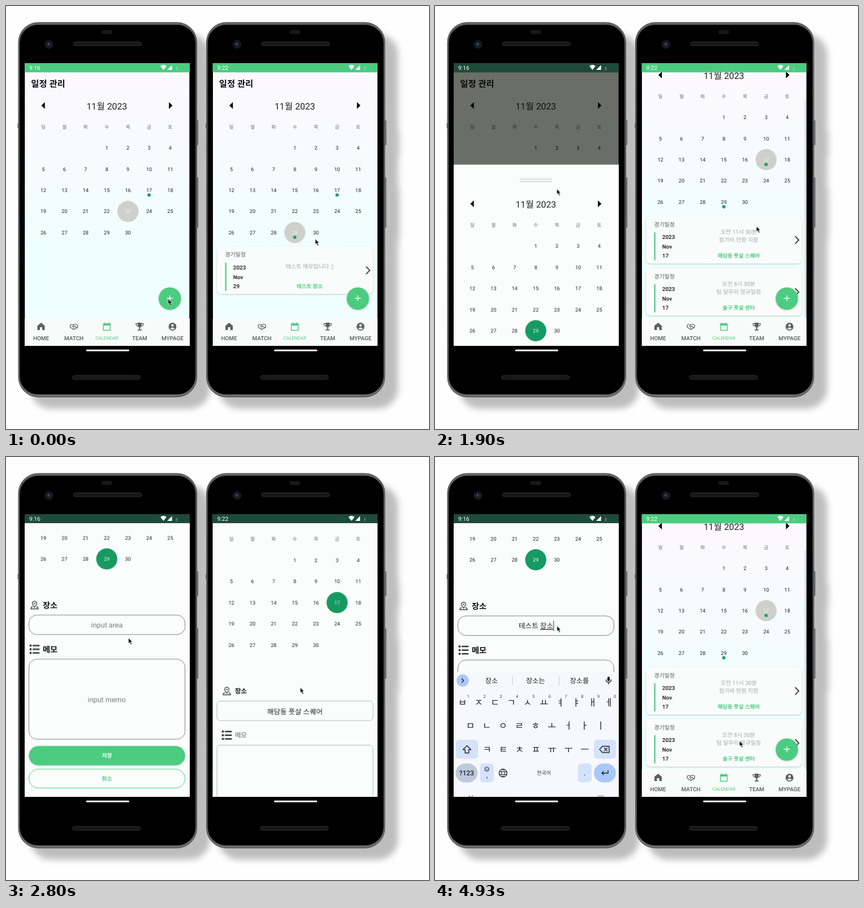
Write an HTML page that moves like this. It is 748x748 px and loops after 5.01 s.

```html
<!DOCTYPE html>
<html lang="ko">
<head>
<meta charset="utf-8">
<title>일정 관리</title>
<style>
html, body { margin: 0; width: 100%; height: 100%; overflow: hidden; background: #fefefe; }
svg { display: block; width: 748px; height: 748px; }
text { font-family: Roboto, "Noto Sans CJK KR", "Noto Sans CJK", sans-serif; text-anchor: middle; text-rendering: geometricPrecision; white-space: pre; }
.start { text-anchor: start; }
.bold { font-weight: 700; }
.mid { font-weight: 500; }
.under { text-decoration: underline; text-decoration-thickness: 1px; text-underline-offset: 2px; }
.line { fill: none; stroke-linecap: round; stroke-linejoin: round; }
.raised { filter: drop-shadow(0 1.2px 1px rgba(0, 0, 0, .22)); }
.shade { filter: blur(6px); }
</style>
</head>
<body>
<svg id="stage" viewBox="0 0 748 748" xmlns="http://www.w3.org/2000/svg"></svg>
<script>
const LOOP = 5010, GREEN = '#4bcc80', DEEP = '#169a62', INK = '#1f2121';
let css = '', count = 0;

// Turns [ms, declaration] stops into a looping keyframe animation.
function anim(stops, ease = 'ease-in-out') {
  const id = 'k' + count++;
  const body = stops.map(([ms, rule]) => `${(ms / LOOP * 100).toFixed(3)}%{${rule}}`).join('');
  css += `@keyframes ${id}{${body}}`;
  return `style="animation:${id} ${LOOP}ms ${ease} infinite"`;
}
const hold = stops => [...stops, [LOOP, ...stops[stops.length - 1].slice(1)]];
const path = stops => anim(hold(stops).map(([ms, x, y]) => [ms, `transform:translate(${x}px,${y}px)`]));
const slide = stops => path(stops.map(([ms, y]) => [ms, 0, y]));
const fade = stops => anim(hold(stops).map(([ms, o]) => [ms, `opacity:${o}`]));
const during = (from, to, inner) => `<g ${anim([[0, `opacity:${from ? 0 : 1}`], [from, 'opacity:1'],
  [to, 'opacity:0'], [LOOP, 'opacity:0']], 'step-end')}>${inner}</g>`;

// Text is placed by its vertical centre.
const text = (x, y, size, str, fill = INK, cls = '') =>
  `<text x="${x}" y="${(y + size * .36).toFixed(2)}" font-size="${size}" fill="${fill}" class="${cls}">${str}</text>`;
const rect = (x, y, w, h, r, fill, more = '') =>
  `<rect x="${x}" y="${y}" width="${w}" height="${h}" rx="${r}" fill="${fill}" ${more}/>`;
const dot = (x, y, r, fill, more = '') => `<circle cx="${x}" cy="${y}" r="${r}" fill="${fill}" ${more}/>`;
const shape = (d, fill) => `<path d="${d}" fill="${fill}"/>`;
const line = (d, color, width = 1) => `<path class="line" d="${d}" stroke="${color}" stroke-width="${width}"/>`;
const at = (x, y, inner) => `<g transform="translate(${x} ${y})">${inner}</g>`;

// Calendar, November 2023
const cell = day => [66 + (day + 2) % 7 * 37.4, 251 + Math.floor((day + 2) / 7) * 37.4];
const number = (day, fill) => text(...cell(day), 9.1, day, fill);
const mark = (day, back, ink) => dot(...cell(day), 18.7, back) + number(day, ink);
const pip = day => { const [x, y] = cell(day); return dot(x, y + 8.4, 2.9, '#18a05e'); };
const grey = day => mark(day, '#cfd0cb', '#f4f4f2');

function calendar() {
  let out = text(178.3, 177, 15.8, '11월 2023') +
    shape('M62.5 176l6.2-6v12z', '#000') + shape('M294.3 176l-6.2-6v12z', '#000');
  [...'일월화수목금토'].forEach((d, i) => out += text(66 + i * 37.4, 213.5, 8.6, d, '#6a6c6b'));
  for (let d = 1; d <= 30; d++) out += number(d);
  return out;
}

function card(y, day, memo, place) {
  const dates = ['2023', 'Nov', day].map((s, i) => text(69.3, 37.3 + i * 16.5, 9.8, s, '#2b2d2c', 'start bold')).join('');
  const top = memo.length > 1 ? 28 : 35.5;
  return at(0, y, rect(40.5, 0, 276, 84, 8, '#fafcfb', 'class="raised"') +
    text(54.7, 14.5, 10, '경기일정', '#555856', 'start mid') +
    rect(55, 28.5, 2.3, 50, 1, GREEN) + dates +
    memo.map((s, i) => text(204.5, top + i * 14.2, 10, s, '#a3a6a4')).join('') +
    text(204.5, 70.3, 9.5, place, GREEN, 'bold') +
    line('M304.8 36l6 6.2-6 6.2', '#222', 1.7));
}

function nav() {
  const g = '#5d615b';
  const icons = [
    shape('M0-7l6.5 5.5V6H2V1h-4v5h-4.5v-7.5z', g),
    line('M-6.5-3l3-1 3 1 3-1.5 4 1.5v4l-2 1-4 3-3-1-4-3v-4M-.5-3l-2 3 2 1 2-2 4 3.5M-1 3.5l1.5 1', g, 1.3),
    line('M-6-5h12V6.500h-12zM-3.500-7v2M3.500-7v2', GREEN, 1.4) + rect(-6, -5, 12, 3, 0, GREEN),
    shape('M-3.500-7h7v5q-.5 3-2.5 3.500V5h2.500v1.800h-7V5H-1V1.500q-2-.5-2.500-3.500z', g) +
      line('M-3.500-5.300h-3q0 4 3.500 4.500M3.500-5.300h3q0 4-3.500 4.500', g, 1.3),
    dot(0, 0, 6.9, g) + dot(0, -2.2, 2.2, '#f9fbfa') + shape('M-4.200 3.600q4.200-4 8.400 0-4.200 3.600-8.400 0z', '#f9fbfa')
  ];
  return rect(33, 553, 292, 48, 0, '#f9fbfa') + ['HOME', 'MATCH', 'CALENDAR', 'TEAM', 'MYPAGE'].map((s, i) => {
    const x = 62 + i * 58.1, on = i === 2;
    return at(x, 567, icons[i]) + text(x, 587.6, on ? 8 : 9.9, s, on ? GREEN : '#555953', on ? '' : 'mid');
  }).join('');
}

const fab = dot(289.7, 517.3, 19.8, GREEN, 'class="raised"') + line('M285 516.8h9.400M289.700 512.100v9.400', '#fff', 1.4);

const pin = line('M-3.800 3.200h-1.600l-1.200 3.300h13.200l-1.200-3.300h-1.600', '#3b3d3d', 1.4) +
  line('M0 3.800l-2.700-4a3.900 3.900 0 1 1 5.400 0z', '#3b3d3d', 1.3) + dot(0, -3, 1.2, '#3b3d3d');
const list = [-6.5, 0, 6.5].map(y => dot(-7, y, 2, '#333') + rect(-3.5, y - 1.3, 12.5, 2.6, 1, '#333')).join('');

// Fields below the sheet's calendar
function form(o) {
  const box = (y, h) => rect(40.5, y, 276, h, o.radius, 'none', `stroke="${o.edge}"`);
  return at(o.icon, 656, pin) + text(o.label, 656, o.size, '장소', '#111', 'start bold') +
    box(673.5, 34.5) + o.place +
    at(o.icon, 734, list) + text(o.label, 734, o.size, '메모', o.memoInk, o.memoClass) +
    box(751.5, o.height) + o.memo +
    rect(40.3, o.save, 276.4, 34, 17, GREEN, 'class="raised"') + text(178.5, o.save + 17.2, 9.8, '저장', '#fff', 'bold') +
    rect(40.5, o.save + 41, 276, 33.3, 16.6, 'none', `stroke="${GREEN}"`) + text(178.5, o.save + 58, 9.8, '취소', GREEN, 'bold');
}

function sheet(fields, picked, scroll, drop) {
  return `<g ${slide(drop)}><g clip-path="url(#page)"><g ${slide(scroll)}>` +
    rect(33, 280.5, 292, 900, 0, '#fafdfc') +
    line('M150.500 306.200h56M150.500 310.400h56', '#b9bcba') +
    at(0, 173.7, calendar() + picked) + fields + '</g></g></g>';
}

// Typing: [start, finished text, word being composed]
const steps = [
  [3340, '', 'ㅌ'], [3450, '', '테'], [3560, '', '텟'], [3680, '', '테스'], [3780, '', '테슽'], [3880, '', '테스트'],
  [4340, '테스트 ', ''], [4420, '테스트 ', 'ㅈ'], [4510, '테스트 ', '자'], [4610, '테스트 ', '장'],
  [4720, '테스트 ', '장ㅅ'], [4820, '테스트 ', '장소']
];
const eachStep = draw => steps.map(([t, done, word], i) =>
  during(t, i + 1 < steps.length ? steps[i + 1][0] : LOOP, draw(done, word))).join('');
const typedText = eachStep((done, word) => {
  const size = 12.6, wide = [...done + word].reduce((w, c) => w + (c === ' ' ? .25 : .92) * size, 0);
  return text(178.5, 691.2, size, `${done}<tspan class="under">${word}</tspan>`) +
    rect(178.5 + wide / 2, 682, 1.4, 18.5, 0, DEEP);
});

function keyboard() {
  const ink = '#202226', pale = '#d5e2fb', blue = '#a9c8fa';
  const row = (keys, x, y, hints) => [...keys].map((k, i) => {
    const cx = x + i * 28.8;
    return text(cx, y, 16.5, k, ink, 'mid') + (hints ? text(cx + 10.3, y - 11, 7.5, (i + 1) % 10, '#444') : '');
  }).join('');
  const mic = at(307, 395, rect(-2.2, -6.5, 4.4, 8, 2.2, ink) + line('M-4.500-1q0 4.500 4.500 4.500t4.500-4.500M0 3.500v3', ink, 1.4));
  const round = dot(49, 395.3, 10.8, blue);
  const teeth = [0, 45, 90, 135].map(a => `<rect x="-1.6" y="-6.500" width="3.2" height="13" fill="${ink}" transform="rotate(${a})"/>`).join('');
  const tools = line('M50.500 392l-3.200 3.300 3.200 3.300', ink, 1.4) +
    at(90, 395.5, line('M-6-6h12v8l-4 4h-8zM6 2h-4v4M-3 0q2.500 3 5 0', ink, 1.4) + dot(-2.5, -2.5, 1, ink) + dot(2.5, -2.5, 1, ink)) +
    text(131.7, 395.5, 9.5, 'GIF', ink, 'bold') +
    at(173.3, 396, line('M-5.500-5.500h11v12h-11zM-3-1h6M-3 1.500h6M-3 4h4', ink, 1.3) + rect(-3, -7.5, 6, 3.5, 1, ink)) +
    at(215, 395.5, teeth + dot(0, 0, 4.8, ink) + dot(0, 0, 2.1, '#f7f8fd')) +
    line('M240.500 388v14', '#c4c6cc') + [261, 265.5, 270].map(x => dot(x, 395.3, 1.3, ink)).join('');
  const hints = eachStep((done, word) => {
    const w = word || '테스트';
    const words = w === '테스트' ? [w, '베스트', w + '를'] : [w, w + '는', w + '를'];
    return words.map((s, i) => text(100 + i * 77.7, 395.3, 12.2, s, ink)).join('');
  });
  return `<g ${slide([[0, 225], [2960, 225], [3130, 0]])}>` +
    rect(33, 380, 292, 225, 0, '#f7f8fd') + round + mic + during(0, steps[0][0], tools) +
    during(steps[0][0], LOOP, line('M47.500 392l3.200 3.300-3.200 3.300', ink, 1.4) + line('M137 388v15M219.500 388v15', '#c8cad0')) + hints +
    row('ㅂㅈㄷㄱㅅㅛㅕㅑㅐㅔ', 48.5, 434, true) + row('ㅁㄴㅇㄹㅎㅗㅓㅏㅣ', 62.7, 475.3) + row('ㅋㅌㅊㅍㅠㅜㅡ', 92, 517) +
    rect(37, 500, 39, 33.5, 6, pale) + line('M56.500 510.500l7 7h-3.800v6h-6.400v-6h-3.800z', ink, 1.4) +
    rect(281, 500, 39, 33.5, 6, pale) + line('M296 511.500h12v11h-12l-5-5.500zM299.500 514.500l5 5M304.500 514.500l-5 5', ink, 1.4) +
    rect(36.5, 542, 39, 33.5, 16.7, '#bccadb') + text(56, 558.8, 12, '?123', ink, 'mid') +
    rect(79.5, 542, 24.5, 33.5, 6, pale) + dot(91.7, 552, 3.8, 'none', `stroke="${ink}"`) +
    line('M89.800 553q1.900 2.200 3.800 0', ink, .8) + dot(90.4, 551, .6, ink) + dot(93, 551, .6, ink) + text(91.7, 562.5, 13, ',', ink) +
    dot(120.3, 558.8, 7, 'none', `stroke="${ink}" stroke-width="1.3"`) +
    line('M113.300 556.500h14M113.300 561.100h14M120.300 551.800q-6 7 0 14q6-7 0-14', ink) +
    text(192.6, 558.8, 9.2, '한국어', '#3c3e42') +
    rect(252.5, 542, 24.5, 33.5, 6, pale) + text(264.7, 558, 14, '.', ink) +
    rect(281, 542, 39, 33.5, 16.7, blue) + line('M306 554.500v4.500h-11M298 556l-3 3 3 3', ink, 1.4) +
    line('M60 599l3.500 3 3.500-3', ink) + `<path d="M288 598.800h11M288 600.800h11" stroke="${ink}" stroke-dasharray="1 1.300"/>` + '</g>';
}

const statusIcons = shape('M273 106.200q5.300-4.600 10.800 0l-5.400 6.800z', '#fff') + shape('M285 113h8.600v-8.600z', '#fff') +
  '<g opacity=".45">' + line('M302 107.500v3M300.700 109.500l1.300 1.400 1.300-1.400M300.500 113h3', '#fff', .9) + '</g>';

const sideKeys = (x, fill) => rect(x, 202, 3.2, 44, 1.2, fill) + rect(x, 303, 3.2, 89, 1.2, fill);

function body() {
  return '<g class="shade" opacity=".25">' + rect(43, 50, 318, 662, 36, '#000') + at(23, 20, sideKeys(337, '#000')) + '</g>' +
    sideKeys(337, '#6f7170') + rect(20.6, 207, 3, 9, 1, '#666') +
    rect(22, 29, 315.4, 662.4, 35, 'url(#rim)', 'stroke="#4a4c4b"') +
    rect(24.6, 33.5, 310.2, 653, 32, '#000', 'stroke="#161717" stroke-width="1.2"') +
    rect(119.5, 63.5, 120, 6.5, 3.2, '#151616', 'stroke="#333535"') + rect(117.5, 653.5, 120, 6.5, 3.2, '#151616', 'stroke="#2f3131"') +
    rect(169, 42.5, 18, 7, 2, '#171818') + dot(76, 68, 6.8, '#15171c', 'stroke="#25272c"') +
    dot(76, 68, 3.2, '#252c3e') + dot(75, 67, 1.2, '#56617c') +
    rect(141.5, 607.5, 76.5, 3, 1.5, '#f1eff0');
}

function phone(x, time, p) {
  const dim = fade(p.scrim);
  return at(x, 0, body() +
    '<g clip-path="url(#screen)">' + rect(33, 101, 292, 500, 0, 'url(#sky)') +
    `<g clip-path="url(#page)"><g ${slide(p.scroll)}>` +
    text(44.3, 137.3, 15.4, '일정 관리', '#0c0d0d', 'start bold') + calendar() + p.main + '</g></g>' +
    (p.bar || '') + nav() + fab + rect(33, 101, 292, 16.3, 0, GREEN) +
    rect(33, 117, 292, 484, 0, '#070c01', `fill-opacity=".59" ${dim}`) +
    rect(33, 101, 292, 16.3, 0, '#1e4a3a', dim) +
    p.sheet + text(41, 109.3, 10.2, time, '#fff', 'start') + statusIcons + '</g>');
}

const cursor = stops => `<g ${path(stops)}><path d="M0 0v9.500l2.200-1.900 1.900 4.100 1.700-.8-1.900-3.900h2.700z" fill="#000" stroke="#fff" stroke-width=".6"/></g>`;

const left = phone(0, '9:16', {
  scroll: [[0, 0]],
  main: grey(23) + pip(17),
  scrim: [[0, 0], [110, 0], [320, 1]],
  sheet: sheet(form({
    icon: 50.5, label: 65, size: 14.2, radius: 14, edge: '#7f8380', memoInk: '#111', memoClass: 'start bold', height: 141.5, save: 905,
    place: during(0, steps[0][0], text(178.5, 691.2, 12.6, 'input area', '#777a78')) + typedText,
    memo: text(178.2, 823, 12.6, 'input memo', '#777a78')
  }), during(1660, LOOP, mark(29, DEEP, '#e6f5ed')),
  [[0, 320.5], [130, 320.5], [400, 0], [1930, 0], [2080, -163.5], [2160, -163.5], [2330, -394], [2960, -394], [3130, -392.5]],
  [[0, 0]]) + keyboard()
});

const right = phone(332.5, '9:22', {
  scroll: [[0, 0], [1250, 0], [1480, -54]],
  main: during(0, 800, grey(29) + card(425.3, 29, ['테스트 메모입니다 :)'], '테스트 장소')) +
    during(800, LOOP, grey(17) + card(425.6, 17, ['오전 11시 30분', '참가비 만원 지참'], '해담동 풋살 스퀘어') +
      card(517.6, 17, ['오전 8시 30분', '팀 달무리 정규일정'], '솔구 풋살 센터')) + pip(17) + pip(29),
  bar: during(1250, LOOP, rect(321, 165, 2.5, 385, 1, '#8aa09c', 'opacity=".3"')),
  scrim: [[0, 0], [1980, 0], [2150, 1], [3420, 1], [3600, 0]],
  sheet: sheet(form({
    icon: 58, label: 72.2, size: 11.6, radius: 6, edge: '#b3beb4', memoInk: '#5f6260', memoClass: 'start', height: 212, save: 978,
    place: text(178.5, 692, 12.5, '해담동 풋살 스퀘어'),
    memo: text(178.5, 849, 12.6, '오전 11시 30분') + text(178.5, 867.8, 12.6, '참가비 만원 지참')
  }), mark(17, DEEP, '#c8eeda'),
  [[0, 320.5], [2000, 320.5], [2220, 0], [2480, 0], [2640, -163.5], [2720, -163.5], [2950, -467]],
  [[0, 0], [3420, 0], [3620, 484]])
});

const pointers = cursor([[0, 287, 518], [130, 287, 518], [530, 206, 397.5], [900, 190, 520], [1300, 104, 577], [1600, 175, 577],
    [1720, 175, 577], [1900, 215.5, 323.5], [1930, 215.5, 323.5], [2080, 216, 160], [2160, 218, 480], [2330, 217.5, 342],
    [2700, 217.5, 342], [2900, 215.7, 298.7]]) +
  cursor([[0, 547, 412], [530, 566, 381], [780, 583, 328], [900, 583, 328], [1250, 571, 444], [1480, 568.5, 389.5], [1980, 568.5, 389.5],
    [2330, 533.5, 403], [2380, 533.5, 403], [2480, 529, 308], [2640, 526, 145], [2720, 522, 480], [2950, 515.5, 200], [3130, 515.5, 485],
    [3210, 515.5, 485], [3370, 514, 566], [3450, 514, 566], [4030, 527, 519], [4600, 534, 508], [4930, 538.5, 502]]);

const defs = `<defs><clipPath id="screen"><rect x="33.3" y="101" width="291" height="500"/></clipPath>
  <clipPath id="page"><rect x="33" y="117" width="292" height="484"/></clipPath>
  <linearGradient id="rim" x1="0" y1="0" x2="0" y2="1"><stop offset="0" stop-color="#626463"/>
  <stop offset=".5" stop-color="#555756"/><stop offset="1" stop-color="#6c6e6d"/></linearGradient>
  <linearGradient id="sky" gradientUnits="userSpaceOnUse" x1="0" y1="117" x2="0" y2="430">
  <stop offset="0" stop-color="#fcf9fe"/><stop offset=".4" stop-color="#f8fafe"/><stop offset="1" stop-color="#effffd"/></linearGradient></defs>`;

document.head.appendChild(document.createElement('style')).textContent = css;
document.getElementById('stage').innerHTML = defs + left + right + pointers;
</script>
</body>
</html>
```
